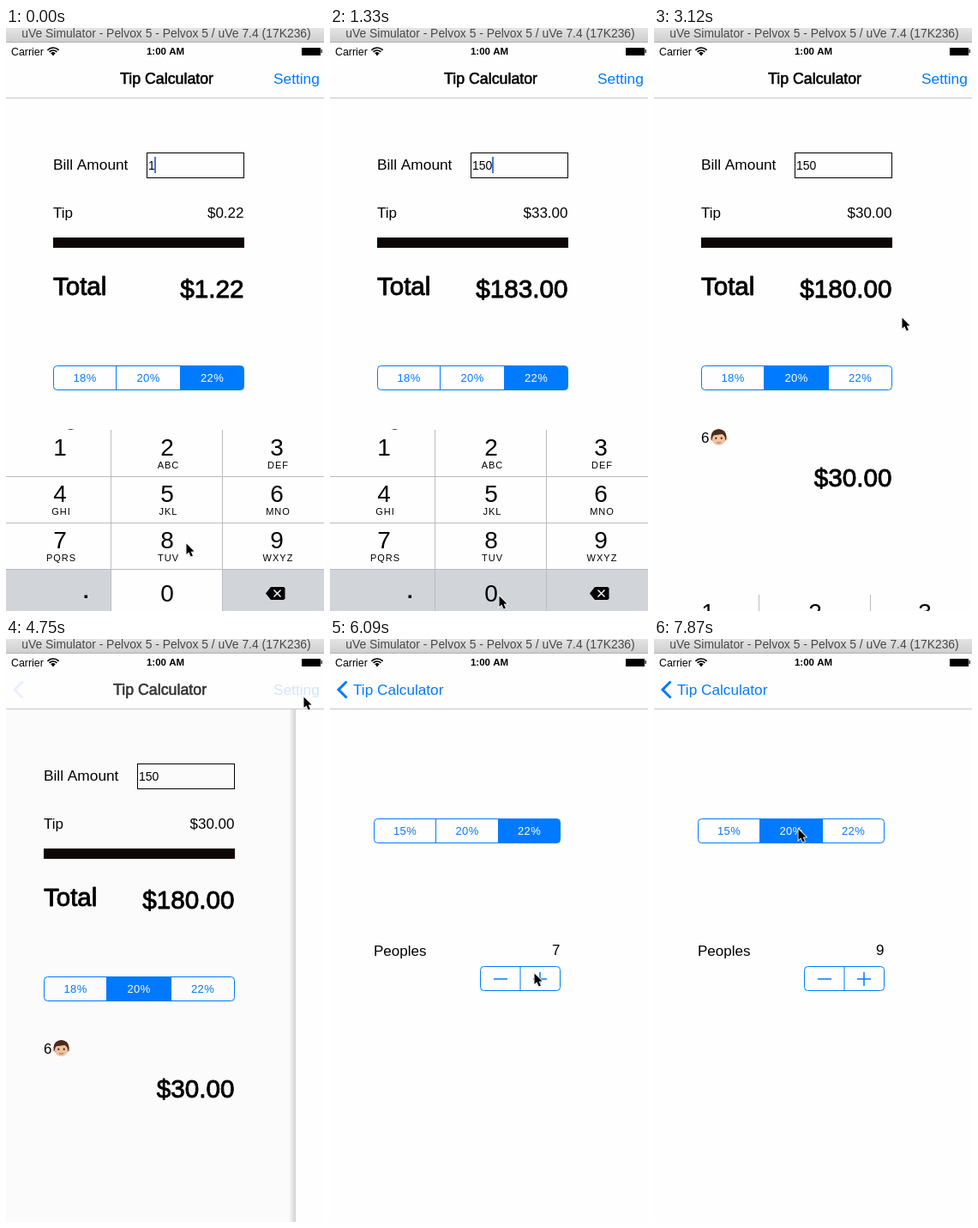
Animation, 371 px wide and 679 px high, one loop 8000 ms. Source, as an HTML page with a canvas:

```html
<!DOCTYPE html>
<html lang="en">
<head>
<meta charset="utf-8">
<title>Tip Calculator</title>
<style>
html, body { margin: 0; width: 100%; height: 100%; overflow: hidden; background: #fefefe; }
canvas { display: block; }
</style>
</head>
<body>
<canvas id="stage" width="371" height="679"></canvas>
<script>
const ctx = document.getElementById('stage').getContext('2d');
const W = 371, H = 679, LOOP = 8000, STEP = 148.2, STEP_LEAD = 8, LAST_STEP = 53;
const BLUE = '#007aff', TINT = '#d9ebff', PAPER = '#fefefe', KEY_GRAY = '#d1d5da';

// Pointer stops: step, x, y
const POINTER = [
  [0, 210, 600], [2, 200, 552], [4, 200, 552], [7, 197, 661], [10, 197, 661],
  [14, 160, 405], [16, 160, 405], [19, 289, 337], [24, 289, 337], [29, 347, 67],
  [32, 347, 67], [35, 320, 144], [38, 238, 389], [47, 238, 389], [51, 168, 221], [53, 168, 221]
];

const lerp = (a, b, k) => a + (b - a) * k;
const clamp = v => Math.max(0, Math.min(1, v));
const money = v => '$' + v.toFixed(2);
// Critically damped spring, u is time in units of its period
const spring = u => u <= 0 ? 0 : 1 - (1 + u) * Math.exp(-u);

function text(str, x, y, size, { color = '#000', align = 'left', weight = '', stroke = 0, spacing = 0 } = {}) {
  ctx.font = `${weight} ${size}px "Liberation Sans", Arial, sans-serif`;
  ctx.textAlign = align;
  ctx.letterSpacing = spacing + 'px';
  ctx.fillStyle = ctx.strokeStyle = color;
  ctx.fillText(str, x, y);
  if (stroke) {
    ctx.lineWidth = stroke;
    ctx.lineJoin = 'round';
    ctx.strokeText(str, x, y);
  }
}

function box(x, y, w, h, color) {
  ctx.fillStyle = color;
  ctx.fillRect(x, y, w, h);
}

function line(points, color, width = 1) {
  ctx.beginPath();
  points.forEach(([x, y]) => ctx.lineTo(x, y));
  ctx.strokeStyle = color;
  ctx.lineWidth = width;
  ctx.lineJoin = 'miter';
  ctx.stroke();
}

function ellipse(x, y, rx, ry, color) {
  ctx.beginPath();
  ctx.ellipse(x, y, rx, ry, 0, 0, Math.PI * 2);
  ctx.fillStyle = color;
  ctx.fill();
}

function polygon(points, color) {
  ctx.beginPath();
  points.forEach(([x, y]) => ctx.lineTo(x, y));
  ctx.closePath();
  ctx.fillStyle = color;
  ctx.fill();
}

// Rounded outline split at the given edges; fills holds one colour or null per cell
function cells(edges, y, fills) {
  const left = edges[0], width = edges[edges.length - 1] - left, height = 28;
  ctx.save();
  ctx.beginPath();
  ctx.roundRect(left, y, width, height, 4);
  ctx.clip();
  fills.forEach((fill, i) => fill && box(edges[i], y, edges[i + 1] - edges[i], height, fill));
  ctx.restore();
  ctx.beginPath();
  ctx.roundRect(left, y, width, height, 4);
  ctx.strokeStyle = BLUE;
  ctx.lineWidth = 1;
  ctx.stroke();
  edges.slice(1, -1).forEach(x => line([[x, y], [x, y + height]], BLUE));
}

function segments(edges, y, labels, selected, pressed) {
  cells(edges, y, labels.map((_, i) => i === selected ? BLUE : i === pressed ? TINT : null));
  labels.forEach((label, i) => text(label, (edges[i] + edges[i + 1]) / 2, y + 18.5, 13,
    { color: i === selected ? '#fff' : BLUE, align: 'center', spacing: 0.4 }));
}

function boyFace(x, y) {
  ellipse(x - 8.3, y + 1.5, 1.8, 2.5, '#dfa984');
  ellipse(x + 8.3, y + 1.5, 1.8, 2.5, '#dfa984');
  ellipse(x, y - 1, 9, 8.6, '#4b2b1c');
  ellipse(x, y + 2.2, 7.6, 7.2, '#efc4a0');
  polygon([[x - 8, y - 2], [x - 5, y - 7], [x + 6, y - 7], [x + 8, y - 1], [x + 4, y - 3.5], [x - 3, y - 2.5]], '#4b2b1c');
  ellipse(x - 3.2, y + 1.2, 1, 1.3, '#3a2418');
  ellipse(x + 3.2, y + 1.2, 1, 1.3, '#3a2418');
  line([[x - 2.5, y + 6], [x, y + 6.7], [x + 2.5, y + 6]], '#b0594a');
}

function calculator(n) {
  const bill = n < 4 ? 1 : n < 9 ? 15 : 150;
  const rate = n < 16 ? 0.22 : 0.2;
  const total = bill * (1 + rate);
  const big = { align: 'right', stroke: 0.9 };
  box(0, 82, W + 4, H - 82, PAPER);
  text('Bill Amount', 55, 165, 17.3);
  ctx.strokeStyle = '#000';
  ctx.lineWidth = 1;
  ctx.strokeRect(164.5, 145.5, 113, 29);
  text(String(bill), 166, 165, 14);
  if (n < 20) box(Math.round(165.5 + ctx.measureText(bill).width), 150, 2, 19, '#4a72e8');
  text('Tip', 55, 221, 17);
  text(money(bill * rate), 277.5, 221, 17, { align: 'right' });
  box(55, 244, 223, 12, '#0d0506');
  text('Total', 55, 311, 29.5, { stroke: 0.9 });
  text(money(total), 277.5, 314, 29.7, big);
  segments([55.5, 128.5, 203.5, 277.5], 393.5, ['18%', '20%', '22%'], n < 16 ? 2 : 1, n === 15 ? 1 : -1);
  text('6', 55, 483, 17);
  boyFace(75.5, 476.6);
  text(money(total / 6), 277.5, 534, 29.7, big);
}

function keypad(n) {
  const letters = ['', 'ABC', 'DEF', 'GHI', 'JKL', 'MNO', 'PQRS', 'TUV', 'WXYZ'];
  const centers = [63, 188, 316];
  ctx.save();
  ctx.translate(0, Math.round(212 * spring(1.52 + 2.44 * (n - 20)) * (n >= 20)));
  box(0, 468, W, 212, PAPER);
  box(0, 630, 123, 50, KEY_GRAY);
  box(252, 630, 119, 50, KEY_GRAY);
  if (n === 3 || n === 4) box(123, 522, 129, 54, KEY_GRAY);
  if (n === 8 || n === 9) box(123, 630, 129, 50, KEY_GRAY);
  [122.5, 252.5].forEach(x => line([[x, 468], [x, 680]], '#b9bcc0'));
  [522.5, 576.5, 630.5].forEach(y => line([[0, y], [W, y]], '#b9bcc0'));
  letters.forEach((label, i) => {
    const x = centers[i % 3], y = 498 + 54 * Math.floor(i / 3);
    text(String(i + 1), x, y, 28, { align: 'center' });
    text(label, x + 1.5, y + 15, 11, { align: 'center', spacing: 1 });
  });
  text('0', 188, 667.5, 28, { align: 'center' });
  box(91.5, 660.5, 3.5, 3.5, '#000');
  polygon([[303, 658.5], [309, 651], [324, 651], [325.5, 652.5], [325.5, 664.5], [324, 666], [309, 666]], '#000');
  line([[312.5, 654.5], [320.5, 662.5]], '#fff', 1.4);
  line([[320.5, 654.5], [312.5, 662.5]], '#fff', 1.4);
  ctx.restore();
}

function settings(n) {
  const people = n < 40 ? 6 : n < 43 ? 7 : n < 47 ? 8 : 9;
  const plusHeld = [39, 40, 42, 43, 46, 47].includes(n);
  box(0, 82, W + 4, H - 82, PAPER);
  segments([51.5, 123.5, 196.5, 268.5], 209.5, ['15%', '20%', '22%'], n < 53 ? 2 : 1, n === 52 ? 1 : -1);
  text('Peoples', 51, 368.5, 17);
  text(String(people), 268.5, 368, 17, { align: 'right' });
  cells([175.5, 222, 268.5], 381.5, [null, plusHeld ? TINT : null]);
  line([[191, 396], [207, 396]], BLUE, 1.5);
  line([[237, 396], [253, 396]], BLUE, 1.5);
  line([[245, 388], [245, 404]], BLUE, 1.5);
}

function navigation(n, push) {
  box(0, 17, W, 64, PAPER);
  box(0, 81, W, 1, '#c8c8c8');
  ctx.globalAlpha = clamp(1 - 2.5 * push);
  text('Tip Calculator', 187.5 - 80 * push, 65, 17.8, { align: 'center', stroke: 0.55 });
  ctx.globalAlpha = clamp(2 * push - 0.2);
  text('Tip Calculator', lerp(133, 27, push), 65, 17.2, { color: BLUE });
  ctx.globalAlpha = push;
  line([[19.5, 49.5], [10, 59], [19.5, 68.5]], BLUE, 3);
  ctx.globalAlpha = (n < 31 ? 1 : 0.2) * (1 - push);
  text('Setting', 312, 65, 17.3, { color: BLUE });
  ctx.globalAlpha = 1;
}

function statusBar() {
  text('Carrier', 6, 31.5, 12.4);
  ctx.strokeStyle = '#000';
  ctx.lineWidth = 1.7;
  [4, 7, 10].forEach(r => {
    ctx.beginPath();
    ctx.arc(55, 32, r - 1, -Math.PI * 0.76, -Math.PI * 0.24);
    ctx.stroke();
  });
  ellipse(55, 30.8, 1.3, 1.3, '#000');
  text('1:00 AM', 186, 31, 11.5, { align: 'center', weight: 'bold' });
  box(345, 23, 22, 9, '#000');
  box(367.5, 25, 1.5, 4, '#333');
}

function windowTitle() {
  const shade = ctx.createLinearGradient(0, 0, 0, 16);
  shade.addColorStop(0, '#e4e4e4');
  shade.addColorStop(1, '#cfcfcf');
  box(0, 0, W, 16, shade);
  box(0, 16, W, 1, '#b0b0b0');
  text('uVe Simulator - Pelvox 5 - Pelvox 5 / uVe 7.4 (17K236)', 187, 11, 13.9,
    { align: 'center', color: '#484848' });
}

function pointer(n) {
  const i = Math.max(1, POINTER.findIndex(([step]) => step >= n));
  const [n0, x0, y0] = POINTER[i - 1], [n1, x1, y1] = POINTER[i];
  const k = (n - n0) / (n1 - n0), eased = k * k * (3 - 2 * k);
  const shape = [[0, 0], [0, 14], [3.2, 11], [5.7, 16.8], [8.2, 15.7], [5.8, 10.2], [10, 10]];
  ctx.save();
  ctx.translate(lerp(x0, x1, eased) + 0.5, lerp(y0, y1, eased) + 0.5);
  ctx.scale(0.9, 0.9);
  ctx.shadowColor = 'rgba(0,0,0,.35)';
  ctx.shadowBlur = 2;
  ctx.shadowOffsetY = 1;
  polygon(shape, '#000');
  ctx.shadowColor = 'transparent';
  ctx.strokeStyle = '#fff';
  ctx.lineWidth = 1.8;
  ctx.stroke();
  polygon(shape, '#000');
  ctx.restore();
}

function screens(n, push) {
  if (push < 1) {
    ctx.save();
    ctx.translate(-Math.round(112.5 * push), 0);
    calculator(n);
    if (n < 22) keypad(n);
    ctx.restore();
  }
  if (push > 0) {
    const edge = Math.round(375 * (1 - push));
    box(0, 82, edge, H - 82, `rgba(0,0,0,${0.1 * push})`);
    if (push < 1) {
      const shadow = ctx.createLinearGradient(edge - 8, 0, edge, 0);
      shadow.addColorStop(0, 'rgba(0,0,0,0)');
      shadow.addColorStop(1, 'rgba(0,0,0,.17)');
      box(edge - 8, 82, 8, H - 82, shadow);
    }
    ctx.save();
    ctx.translate(edge, 0);
    settings(n);
    ctx.restore();
  }
}

function draw(now) {
  const n = Math.min(LAST_STEP, Math.floor((now % LOOP + STEP_LEAD) / STEP));
  const push = n < 32 ? 0 : n > 35 ? 1 : spring(0.53 + 2.44 * (n - 32));
  box(0, 0, W, H, PAPER);
  screens(n, push);
  navigation(n, push);
  statusBar();
  windowTitle();
  pointer(n);
}

const start = performance.now();
function tick() {
  draw(performance.now() - start);
  requestAnimationFrame(tick);
}
tick();
</script>
</body>
</html>
```
